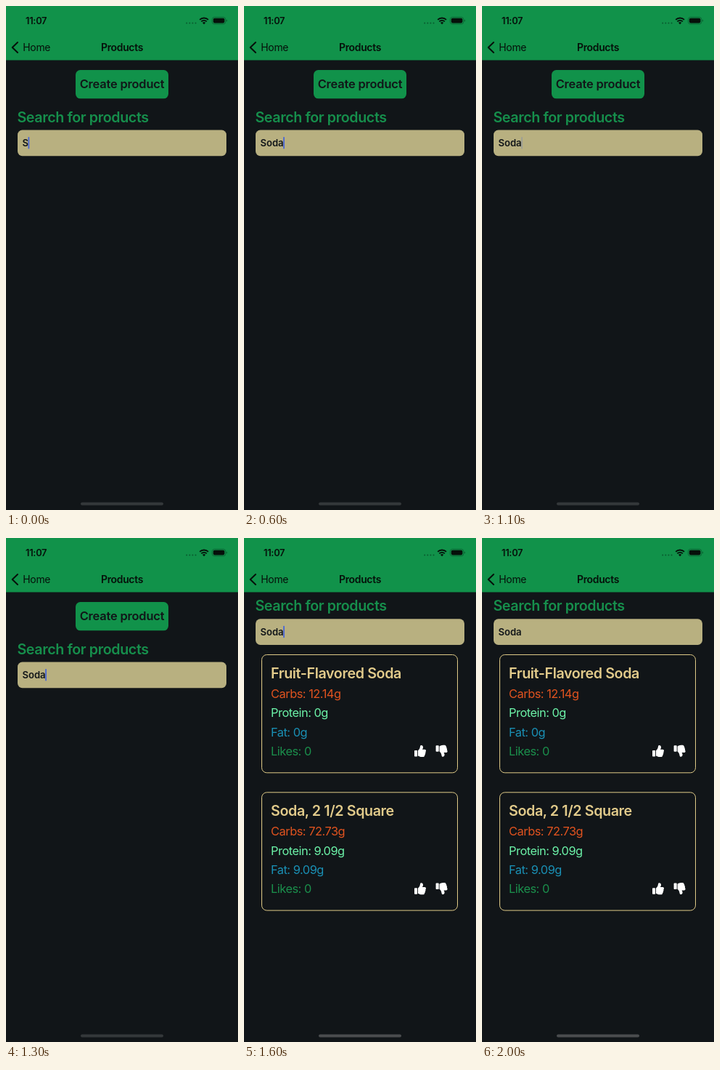
Recreate the animation shown at these times as an HTML page. Size 320 by 693 pixels, loop 2100 ms.

```html
<!DOCTYPE html>
<html lang="en">
<head>
<meta charset="utf-8">
<title>Product search</title>
<style>
  html, body { margin: 0; width: 100%; height: 100%; overflow: hidden; background: #111518; }
  svg { display: block; width: 320px; height: 693px; }
  text { font-family: Inter, Roboto, sans-serif; font-optical-sizing: none; white-space: pre; }
  .title { font-size: 19.7px; font-weight: 600; letter-spacing: -.02em; }
  .row { font-size: 16.4px; letter-spacing: -.03em; }
  .button { font-size: 16.4px; font-weight: 600; letter-spacing: -.01em; }
  .input { font-size: 13.1px; font-weight: 600; }
  .nav { font-size: 13.95px; letter-spacing: -.022em; }
  .clock { font-size: 12.8px; font-weight: 600; letter-spacing: -.02em; }
</style>
</head>
<body>
<svg viewBox="0 0 320 693">
  <defs>
    <g id="thumb" fill="#fff">
      <rect y="7" width="4.1" height="8.5" rx=".8"/>
      <path d="M5 7.3C7 5.6 7.6 4.2 7.9 2C8.2 .2 8.8 0 9.5 0C11.1 .1 12 1.2 12 2.7C12 4 11.4 4.8 11 5.7H14.2C15.4 5.7 16 6.6 16 7.5C16 8.4 15.7 8.9 15.3 9.2C15.8 10.2 15.4 11.3 14.8 11.8C15 13 14.5 13.8 14 14.2C14 15.5 13 16 11.5 16H10C8 16 6.5 15 5 14.4Z"/>
    </g>
  </defs>

  <g id="page">
    <rect x="96" y="88" width="128" height="39.3" rx="6.5" fill="#11924a"/>
    <text class="button" x="160" y="113.3" text-anchor="middle" fill="#111518">Create product</text>
    <text class="title" x="15.4" y="159.5" fill="#168f4c">Search for products</text>
    <rect x="16" y="170.5" width="288" height="35.7" rx="6.5" fill="#b8b080"/>
    <text class="input" id="query" x="22.4" y="193" fill="#111518"></text>
    <rect id="caret" y="180" width="1.7" height="16.5" rx=".8" fill="#4262dc"/>
  </g>
  <g id="cards"></g>

  <rect width="320" height="74.5" fill="#11924a"/>
  <g fill="#06100a">
    <text class="clock" x="27" y="25">11:07</text>
    <text class="nav" x="23.3" y="62">Home</text>
    <text class="nav" x="160" y="62" text-anchor="middle" font-weight="600">Products</text>
    <path d="M16 50L8.7 57L16 64" fill="none" stroke="#06100a" stroke-width="2" stroke-linecap="round" stroke-linejoin="round"/>
    <path d="M249.2 23.5h.01m4.1 0h.01m4.1 0h.01m4.1 0h.01" stroke="#0a5a2f" stroke-width="2" stroke-linecap="round"/>
    <g fill="none" stroke="#06100a" stroke-width="1.9">
      <path d="M267.2 18.9a8.3 8.3 0 0 1 11.8 0"/>
      <path d="M269.4 21.4a5.2 5.2 0 0 1 7.4 0"/>
    </g>
    <path d="M271 23.1a3 3 0 0 1 4.2 0L273.1 25.2Z"/>
    <rect x="284.4" y="15.4" width="18.4" height="9.4" rx="3" fill="none" stroke="#0b6233" stroke-width=".9"/>
    <rect x="285.8" y="16.8" width="15.6" height="6.6" rx="1.8"/>
    <path d="M303.9 18.5q1.2 .4 1.2 1.6t-1.2 1.6Z" fill="#0b6233"/>
  </g>
  <rect id="home" x="103" y="682.4" width="114" height="4" rx="2"/>
</svg>

<script>
const $ = id => document.getElementById(id);
const loop = 2100, step = 100, resultsAt = 1400;
const keyTimes = [0, 200, 300, 500];
const rowColors = ["#e0531f", "#6cf3a8", "#1a90b5", "#1b8f4c"];

function card(y, name, carbs, protein, fat) {
  const rows = [`Carbs: ${carbs}g`, `Protein: ${protein}g`, `Fat: ${fat}g`, "Likes: 0"];
  return `<g transform="translate(0 ${y})">
    <rect x="24.5" y=".5" width="270" height="162.3" rx="7" fill="none" stroke="#dfca87"/>
    <text class="title" x="37" y="33" fill="#e2cb8b">${name}</text>
    ${rows.map((row, i) =>
      `<text class="row" x="37" y="${60 + i * 26.3}" fill="${rowColors[i]}">${row}</text>`).join("")}
    <use href="#thumb" transform="translate(235 125)"/>
    <use href="#thumb" transform="translate(264.6 140.8) scale(1 -1)"/>
  </g>`;
}

$("cards").innerHTML =
  card(160, "Fruit-Flavored Soda", "12.14", "0", "0") +
  card(349.3, "Soda, 2 1/2 Square", "72.73", "9.09", "9.09");

// The caret fades out and back around each of its two dark moments.
function caretAlpha(t) {
  const gap = Math.min(Math.abs(t - 950), Math.abs(t - 2050));
  return Math.max(0, Math.min(1, (gap - 100) / 200));
}

function draw(now) {
  const t = Math.floor(now % loop / step) * step;
  const found = t >= resultsAt;
  const query = $("query"), caret = $("caret");

  query.textContent = "Soda".slice(0, keyTimes.filter(k => k <= t).length);
  caret.setAttribute("x", 22 + query.getComputedTextLength());
  caret.setAttribute("opacity", caretAlpha(t));
  $("page").setAttribute("transform", `translate(0 ${found ? -59.2 : 0})`);
  $("cards").setAttribute("visibility", found ? "visible" : "hidden");
  $("home").setAttribute("fill", found ? "#4a4c4e" : "#34383a");
}

const start = performance.now();
function tick() {
  draw(performance.now() - start);
  requestAnimationFrame(tick);
}
tick();
</script>
</body>
</html>
```
